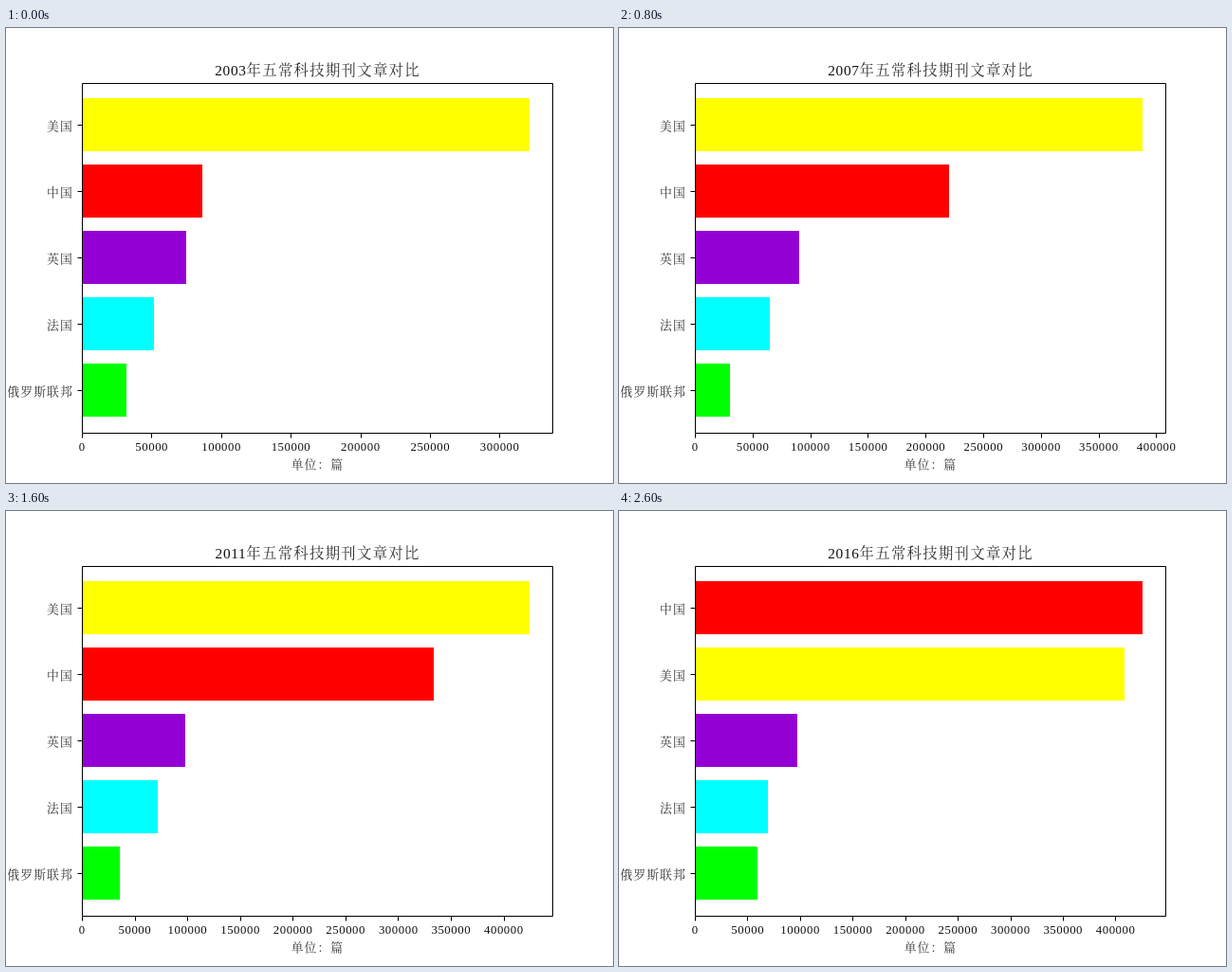
Animation of 640x480 px, one loop 2800 ms. Source, as an HTML page:

```html
<!DOCTYPE html>
<html lang="zh-CN">
<head>
<meta charset="utf-8">
<style>
  html, body { margin: 0; width: 100%; height: 100%; overflow: hidden; background: #fff; }
  svg { display: block; }
  text { font: 12.8px "Liberation Serif", FangSong, "Noto Serif CJK SC", "Noto Sans CJK SC", "Noto Sans CJK", serif; }
  .han { font-weight: 200; fill: #333; letter-spacing: .085em; }
  .title { font-size: 15.36px; }
  .digits { font-weight: 400; fill: #111; letter-spacing: .0425em; }
  .mid { text-anchor: middle; }
  .end { text-anchor: end; }
  .line { fill: none; stroke: #000; stroke-width: 1; }
</style>
</head>
<body>
<svg width="640" height="480" viewBox="0 0 640 480">
  <g id="bars"></g>
  <path class="line" d="M80.5 58.5H576.5V427.5H80.5Z"/>
  <path class="line" id="ticks"/>
  <g id="labels"></g>
  <text class="han title mid" x="328.6" y="50"><tspan class="digits" id="year"></tspan>年五常科技期刊文章对比</text>
  <text class="han mid" x="328.5" y="465">单位：篇</text>
</svg>
<script>
const STEP = 200, FIRST = 2003, LAST = 2016, LEFT = 80, WIDTH = 496;

// Turning points of each curve, in thousands of articles
const keys = [2003, 2006, 2008, 2011, 2013, 2015, 2016];
const series = [
  { name: "美国", color: "#ffff00", at: [321.8, 383.1, 392, 425, 435.4, 429.4, 409] },
  { name: "中国", color: "#ff0000", at: [86.6, 189.8, 249.8, 333.9, 363.2, 411.9, 426.2] },
  { name: "英国", color: "#9400d3", at: [75, 88.4, 92.1, 98, 103.2, 101.8, 97.5] },
  { name: "法国", color: "#00ffff", at: [51.8, 62.4, 67.2, 72, 75.6, 72.7, 69.4] },
  { name: "俄罗斯联邦", color: "#00ff00", at: [32, 29.2, 31.4, 36, 39.6, 52.8, 59.5] }
];
const $ = id => document.getElementById(id);

const span = k => keys[k + 1] - keys[k];
const secant = (p, k) => (p[k + 1] - p[k]) / span(k);

// Slope at a turning point; the ends continue the bend of their neighbour
function slope(p, k) {
  const end = keys.length - 1;
  if (k === 0) return 2 * secant(p, 0) - slope(p, 1);
  if (k === end) return 2 * secant(p, end - 1) - slope(p, end - 1);
  const a = span(k - 1), b = span(k);
  return (secant(p, k - 1) * b + secant(p, k) * a) / (a + b);
}

// Cubic Hermite curve through the turning points
function valueAt(p, year) {
  let k = 0;
  while (year > keys[k + 1]) k++;
  const h = span(k), t = (year - keys[k]) / h, u = 1 - t;
  return p[k] * u * u * (1 + 2 * t) + p[k + 1] * t * t * (3 - 2 * t)
    + h * t * u * (u * slope(p, k) - t * slope(p, k + 1));
}

function draw(year) {
  const rows = series
    .map(s => ({ name: s.name, color: s.color, value: valueAt(s.at, year) }))
    .sort((a, b) => b.value - a.value);
  const limit = rows[0].value * 1.05;
  const px = v => LEFT + WIDTH * v / limit;
  let bars = "", labels = "", ticks = "";

  rows.forEach((r, k) => {
    const y = 70 * k;
    bars += `<rect x="${LEFT}" y="${74 + y}" width="${Math.round(px(r.value)) - LEFT}" height="56" fill="${r.color}"/>`;
    labels += `<text class="han end" x="70.8" y="${107.5 + y}">${r.name}</text>`;
    ticks += `M75.5 ${102.5 + y}H80`;
  });

  const gap = limit > 450 ? 100 : 50;
  for (let v = 0; v <= limit; v += gap) {
    const x = px(v);
    ticks += `M${Math.round(x) + 0.5} 428V432.5`;
    labels += `<text class="digits mid" x="${(x + 0.3).toFixed(2)}" y="446">${v * 1000}</text>`;
  }

  $("bars").innerHTML = bars;
  $("labels").innerHTML = labels;
  $("ticks").setAttribute("d", ticks);
  $("year").textContent = year;
}

let shown = FIRST;
draw(shown);
const start = performance.now();

function tick() {
  const step = Math.floor((performance.now() - start) / STEP);
  const year = FIRST + step % (LAST - FIRST + 1);
  if (year !== shown) draw(shown = year);
  requestAnimationFrame(tick);
}
requestAnimationFrame(tick);
</script>
</body>
</html>
```
